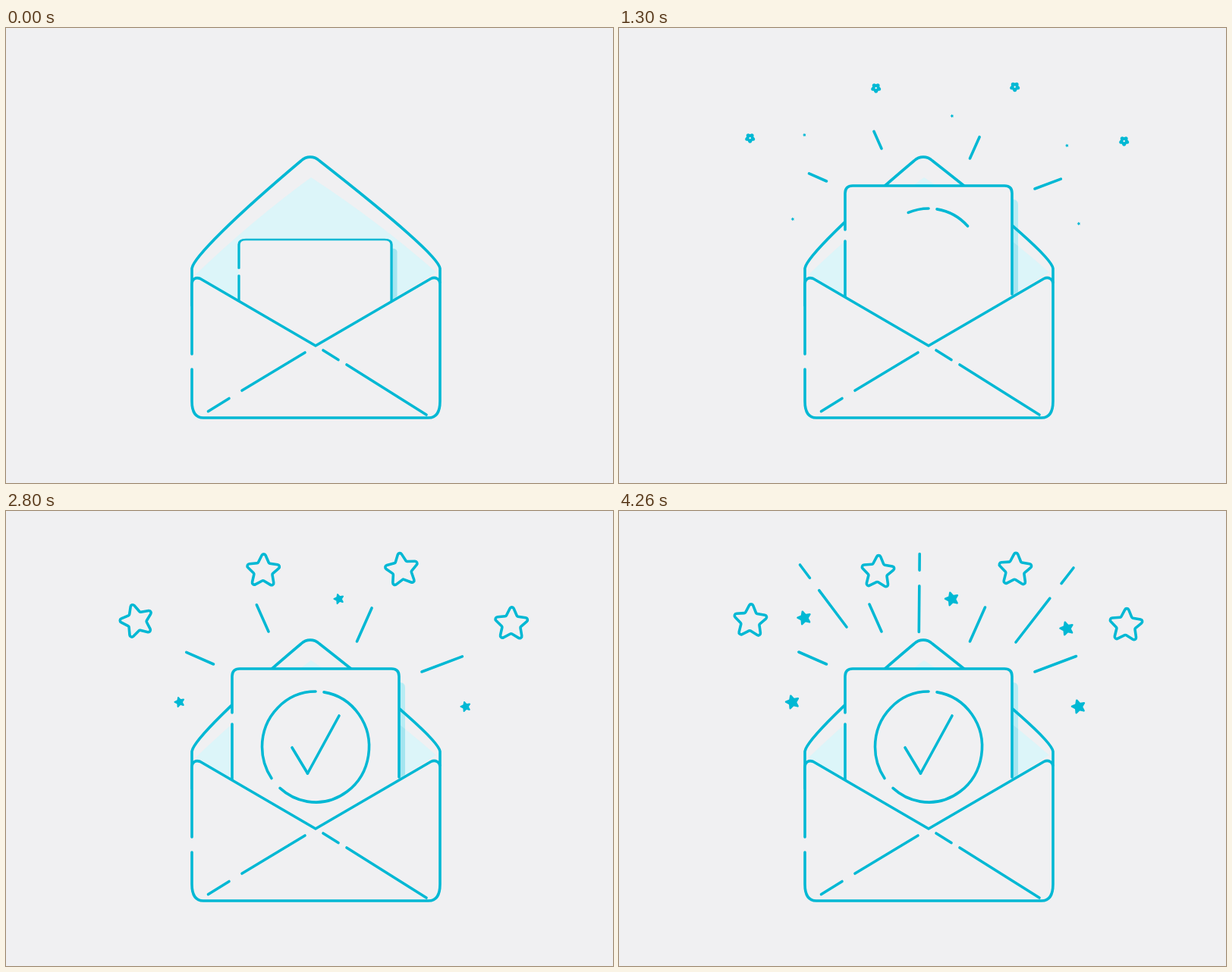
Animation, 800 px wide and 600 px high, one loop 4.82 s. Source, as an HTML page with a canvas:

```html
<!DOCTYPE html>
<html lang="en">
<head>
<meta charset="utf-8">
<title>Envelope</title>
<style>
html, body { margin: 0; height: 100%; overflow: hidden; background: #f0f0f2; }
canvas { display: block; }
</style>
</head>
<body>
<canvas id="c" width="800" height="600"></canvas>
<script>
const g = document.getElementById('c').getContext('2d');
const LOOP = 4820, BG = '#f0f0f2', INK = '#00b8d4';

const flap = new Path2D('M245 366V317C247 303 300 250 389 175C396 168.5 406 168.5 413 175C515 255 570 303 572 317V336');
const liner = new Path2D('M402 197Q488 253 567 322L408 419L250 325Q324 254 402 197Z');
const pocket = 'M245 430V338C245 331 250 328 256 330.5L408 419L560 330.5C566 327.5 572 331 572 338V492C572 506 567 514 557 514H260C250 514 245 506 245 492V450';
const pocketFill = new Path2D(pocket);
const pocketLine = new Path2D(pocket + 'M266.5 505.5L294 488.5M311 478L394 428M418 425L438 437.5M449 444L554 510');
const cardFill = new Path2D('M-110 300V10Q-110 0 -100 0H100Q110 0 110 10V300Z');
const cardLine = new Path2D('M-110 300V73M-110 58V10Q-110 0 -100 0H100Q110 0 110 10V143');
const shadow = new Path2D('M0 18H111Q118 18 118 25V300H0Z');

// rays run from their fixed end to their moving end
const shortRays = [[273.5, 202, 237, 186], [346, 159, 330, 123], [462.5, 172, 482.5, 127], [548, 212, 602.5, 191.5]];
const longRays = [[238.5, 71, 300, 153], [396.2, 56.5, 395.3, 159.5], [599, 75, 523, 173]];

const bigStars = [
  { x: 173, y: 145, turn: t => swing(t, 2480) },
  { x: 339, y: 79, turn: spin },
  { x: 522, y: 77.5, turn: t => swing(t, 2570) },
  { x: 666, y: 149, turn: spin }
];
// mid: centre of the time out of sight, pause: half its length
const smallStars = [
  { x: 244.5, y: 141, mid: 3080, pause: 280 },
  { x: 590.5, y: 155, mid: 3060, pause: 280 },
  { x: 439, y: 116, mid: 3270, pause: 190 },
  { x: 229, y: 252, mid: 3270, pause: 190 },
  { x: 606, y: 258, mid: 3220, pause: 140 }
];

const clamp = (v, a = 0, b = 1) => Math.min(b, Math.max(a, v));
const part = (t, a, b) => clamp((t - a) / (b - a));
const mix = (a, b, u) => a + (b - a) * u;
const ease = (t, a, b) => (u => u * u * (3 - 2 * u))(part(t, a, b));
// cosine wave: 0 at time zero, 1 half a period later
const wave = (t, zero, half) => (1 - Math.cos(Math.PI * (t - zero) / half)) / 2;

function swing(t, peak, half = 650) {
  return mix(-36, 3, wave(clamp(t, peak - half, peak + 2 * half), peak - half, half));
}

function spin(t) {
  return mix(-36, 75, part(t, 1680, 4260) ** 1.3);
}

function fill(path, color) {
  g.fillStyle = color;
  g.fill(path);
}

function segment([x1, y1, x2, y2], a, b) {
  if (b - a < 0.004) return;
  g.beginPath();
  g.moveTo(mix(x1, x2, a), mix(y1, y2, a));
  g.lineTo(mix(x1, x2, b), mix(y1, y2, b));
  g.stroke();
}

function arc(from, to, u) {
  g.beginPath();
  g.ellipse(408, 311, 70.5, 73, 0, from, mix(from, to, u), to < from);
  g.stroke();
}

function starPath(size) {
  const point = i => {
    const r = (i % 2 ? 12.5 : 26) * size, a = i * Math.PI / 5;
    return [r * Math.sin(a), -r * Math.cos(a)];
  };
  const [ax, ay] = point(0), [bx, by] = point(1);
  g.beginPath();
  g.moveTo((ax + bx) / 2, (ay + by) / 2);
  for (let i = 1; i <= 10; i++) g.arcTo(...point(i), ...point(i + 1), (i % 2 ? 2 : 2.8) * size);
  g.closePath();
}

// turns about the middle of its box, a little below the star's centre
function star(x, y, deg, size, filled) {
  if (size < 0.01) return;
  const drop = 2.3 * size;
  g.save();
  g.translate(x, y + drop);
  g.rotate(deg * Math.PI / 180);
  g.translate(0, -drop);
  starPath(size);
  filled ? g.fill() : g.stroke();
  g.restore();
}

function onCard(t, paint) {
  const grow = 1 - (1 - part(t, 20, 780)) ** 1.7;
  const rise = 1 - (1 - part(t, 20, 710)) ** 1.28;
  g.save();
  g.translate(mix(407.5, 408, grow), mix(279, 186.7, rise) + 21.3 * ease(t, 710, 780));
  g.scale(mix(0.914, 1, grow), mix(0.65, 1, grow));
  paint();
  g.restore();
}

function drawBadge(t) {
  const ring = ease(t, 1150, 1710), length = 126.5 * ease(t, 1380, 1900);
  if (ring > 0) {
    arc(-1.414, 2.3, ring);
    arc(-Math.PI / 2, -3.746, ring);
  }
  segment([377, 312, 397.5, 346], 0, clamp(length / 39.7));
  segment([397.5, 346, 439, 270], 0, clamp((length - 39.7) / 86.8));
}

function drawRays(t) {
  const pulse = t < 3706 ? wave(t, 2050, 828) : ease(t, 3706, 4250);
  const near = Math.min(pulse, ease(t, 1160, 1400));
  const far = wave(clamp(t, 1720, 3340), 1720, 540);
  for (const r of shortRays) segment(r, 0, near);
  for (const r of longRays) {
    segment(r, 0, Math.min(far, 0.21));
    segment(r, 0.41, far);
  }
}

function drawStars(t) {
  const pop = ease(t, 1160, 1620);
  for (const { x, y, turn } of bigStars) star(x, y, turn(t), pop);
  g.fillStyle = INK;
  for (const { x, y, mid, pause } of smallStars) {
    star(x, y, -16, 0.45 * pop * ease(Math.abs(t - mid), pause, pause + 420), true);
  }
}

function draw(t) {
  g.fillStyle = BG;
  g.fillRect(0, 0, 800, 600);
  g.strokeStyle = INK;
  g.lineWidth = 3.6;
  g.lineCap = g.lineJoin = 'round';

  fill(liner, '#dcf5f9');
  onCard(t, () => fill(shadow, '#b8ecf4'));
  g.save();
  g.clip(liner);
  onCard(t, () => fill(shadow, '#a4e5f0'));
  g.restore();
  g.stroke(flap);
  onCard(t, () => { fill(cardFill, BG); g.stroke(cardLine); });
  fill(pocketFill, BG);
  g.stroke(pocketLine);

  drawBadge(t);
  drawRays(t);
  drawStars(t);
}

function tick() {
  draw(performance.now() % LOOP);
  requestAnimationFrame(tick);
}
tick();
</script>
</body>
</html>
```
